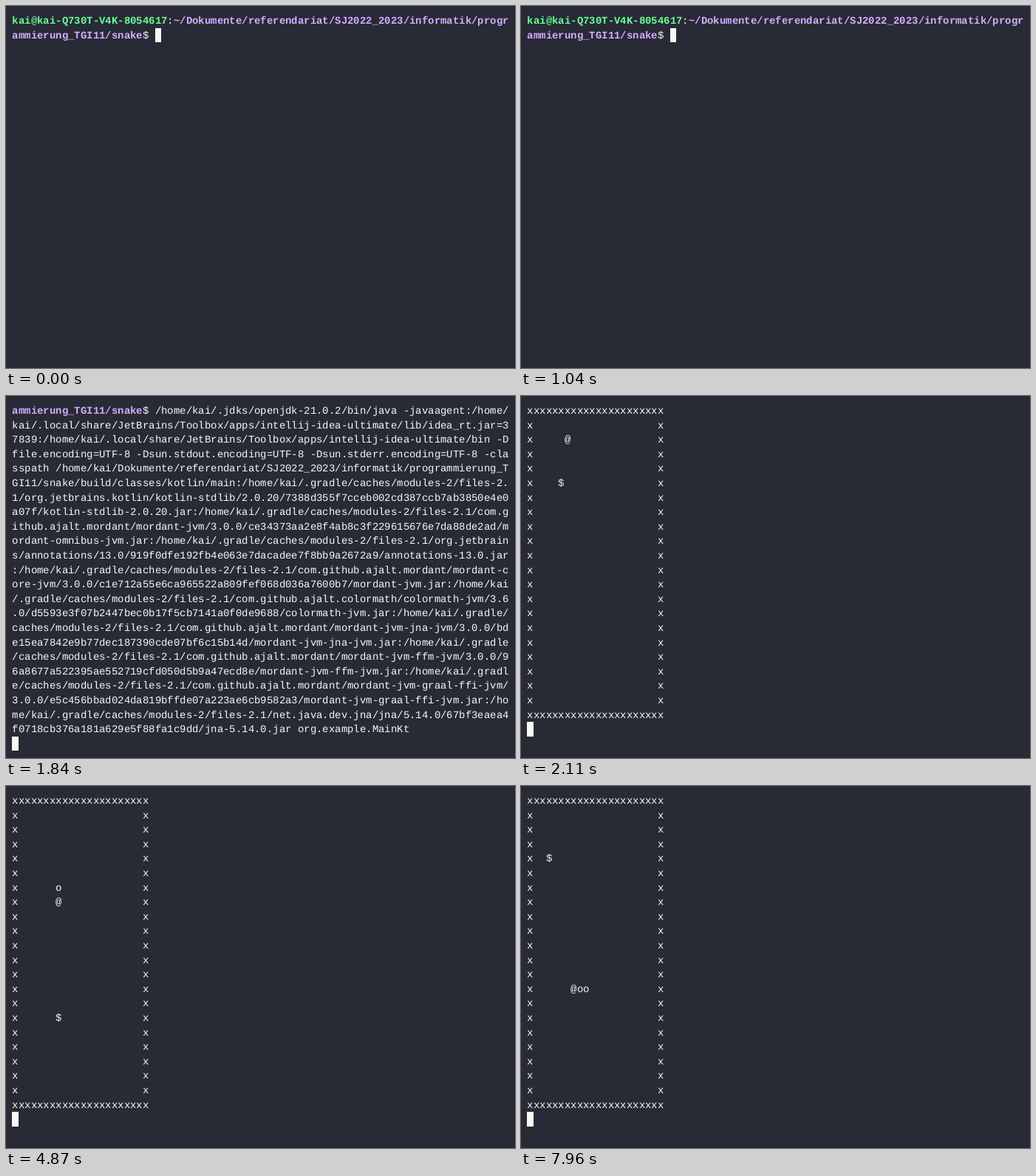
Write an HTML page that moves like this. It is 689 by 490 pixels and loops after 8000 ms.

```html
<!DOCTYPE html>
<html lang="de">
<head>
<meta charset="utf-8">
<title>Snake im Terminal</title>
<style>
  html, body { margin: 0; width: 689px; height: 490px; overflow: hidden; background: #282a36; }
  svg { display: block; }
  text {
    font: 14px "Liberation Mono", monospace;
    fill: #f8f8f2;
    white-space: pre;
    text-rendering: geometricPrecision;
  }
  .user, .path { font-weight: bold; }
  .user { fill: #69ff94; }
  .path { fill: #d6acff; }
</style>
</head>
<body>
<svg id="term" width="689" height="490" viewBox="0 0 689 490"></svg>
<script>
const LOOP = 8000, COLS = 80;

// The cell grid snaps to whole pixels
const cellX = col => Math.round(8.4 * (col + 1));
const cellY = row => Math.round(10 + 19.6 * row);
const ASCENT = 14;
const glyphX = Array.from({ length: COLS }, (_, col) => cellX(col)).join(' ');

const span = (cls, s) => `<tspan class="${cls}">${s}</tspan>`;

const prompt = [
  span('user', 'kai@kai-Q730T-V4K-8054617') + ':' +
    span('path', '~/Dokumente/referendariat/SJ2022_2023/informatik/progr'),
  span('path', 'ammierung_TGI11/snake') + '$ '
];

const command = `/home/kai/.jdks/openjdk-21.0.2/bin/java -javaagent:/home/
kai/.local/share/JetBrains/Toolbox/apps/intellij-idea-ultimate/lib/idea_rt.jar=3
7839:/home/kai/.local/share/JetBrains/Toolbox/apps/intellij-idea-ultimate/bin -D
file.encoding=UTF-8 -Dsun.stdout.encoding=UTF-8 -Dsun.stderr.encoding=UTF-8 -cla
sspath /home/kai/Dokumente/referendariat/SJ2022_2023/informatik/programmierung_T
GI11/snake/build/classes/kotlin/main:/home/kai/.gradle/caches/modules-2/files-2.
1/org.jetbrains.kotlin/kotlin-stdlib/2.0.20/7388d355f7cceb002cd387ccb7ab3850e4e0
a07f/kotlin-stdlib-2.0.20.jar:/home/kai/.gradle/caches/modules-2/files-2.1/com.g
ithub.ajalt.mordant/mordant-jvm/3.0.0/ce34373aa2e8f4ab8c3f229615676e7da88de2ad/m
ordant-omnibus-jvm.jar:/home/kai/.gradle/caches/modules-2/files-2.1/org.jetbrain
s/annotations/13.0/919f0dfe192fb4e063e7dacadee7f8bb9a2672a9/annotations-13.0.jar
:/home/kai/.gradle/caches/modules-2/files-2.1/com.github.ajalt.mordant/mordant-c
ore-jvm/3.0.0/c1e712a55e6ca965522a809fef068d036a7600b7/mordant-jvm.jar:/home/kai
/.gradle/caches/modules-2/files-2.1/com.github.ajalt.colormath/colormath-jvm/3.6
.0/d5593e3f07b2447bec0b17f5cb7141a0f0de9688/colormath-jvm.jar:/home/kai/.gradle/
caches/modules-2/files-2.1/com.github.ajalt.mordant/mordant-jvm-jna-jvm/3.0.0/bd
e15ea7842e9b77dec187390cde07bf6c15b14d/mordant-jvm-jna-jvm.jar:/home/kai/.gradle
/caches/modules-2/files-2.1/com.github.ajalt.mordant/mordant-jvm-ffm-jvm/3.0.0/9
6a8677a522395ae552719cfd050d5b9a47ecd8e/mordant-jvm-ffm-jvm.jar:/home/kai/.gradl
e/caches/modules-2/files-2.1/com.github.ajalt.mordant/mordant-jvm-graal-ffi-jvm/
3.0.0/e5c456bbad024da819bffde07a223ae6cb9582a3/mordant-jvm-graal-ffi-jvm.jar:/ho
me/kai/.gradle/caches/modules-2/files-2.1/net.java.dev.jna/jna/5.14.0/67bf3eaea4
f0718cb376a181a629e5f88fa1c9dd/jna-5.14.0.jar org.example.MainKt`.split('\n');

// Shell screens: rows of markup plus the cursor cell
const empty = { rows: prompt, cursor: [23, 1] };
const typed = {
  rows: [prompt[0], prompt[1] + command[0], ...command.slice(1)],
  cursor: [64, 23]
};
const entered = { rows: typed.rows.slice(1), cursor: [0, 23] };

// Snake: one move per tick; a key press makes its tick come early
const moves = 'DDDDD' + 'LUUUR' + 'R' + 'D'.repeat(11) + 'RRRUULLL';
const ticks = [
  2350, 2560, 2770, 2990, 3190, 3350, 3510, 3715, 3920, 4080,
  4290, 4460, 4665, 4870, 5070, 5280, 5490, 5700, 5905, 6115,
  6320, 6530, 6720, 6920, 7130, 7235, 7440, 7545, 7750, 7960
];
const foods = [[5, 5], [7, 15], [3, 4]];
const dirs = { U: [0, -1], D: [0, 1], L: [-1, 0], R: [1, 0] };

function board(snake, food) {
  const wall = 'x'.repeat(22), side = 'x' + ' '.repeat(20) + 'x';
  const grid = [wall, ...Array(20).fill(side), wall].map(r => [...r]);
  const put = ([x, y], ch) => { grid[y][x] = ch; };
  put(food, '$');
  snake.forEach((cell, i) => put(cell, i ? 'o' : '@'));
  return { rows: grid.map(r => r.join('')), cursor: [0, 22] };
}

function play() {
  let snake = [[6, 2]], eaten = 0;
  const steps = [[2110, board(snake, foods[0])]];
  [...moves].forEach((m, i) => {
    const head = snake[0].map((v, axis) => v + dirs[m][axis]);
    snake = [head, ...snake];
    if (String(head) === String(foods[eaten])) eaten++;
    else snake.pop();
    steps.push([ticks[i], board(snake, foods[eaten])]);
  });
  return steps;
}

const timeline = [
  [0, empty], [870, typed], [1040, empty], [1480, typed], [1840, entered],
  ...play()
];

const term = document.getElementById('term');

function draw({ rows, cursor: [col, row] }) {
  const x = cellX(col), y = cellY(row);
  const w = cellX(col + 1) - x, h = cellY(row + 1) - y;
  const lines = rows.map((r, i) =>
    `<text x="${glyphX}" y="${cellY(i) + ASCENT}">${r}</text>`);
  term.innerHTML =
    `<rect x="${x}" y="${y}" width="${w}" height="${h}" fill="#f8f8f2"/>` + lines.join('');
}

const start = performance.now();
let shown = null;

function frame() {
  const t = (performance.now() - start) % LOOP;
  const screen = timeline.findLast(([at]) => at <= t)[1];
  if (screen !== shown) draw(shown = screen);
  requestAnimationFrame(frame);
}
frame();
</script>
</body>
</html>
```
